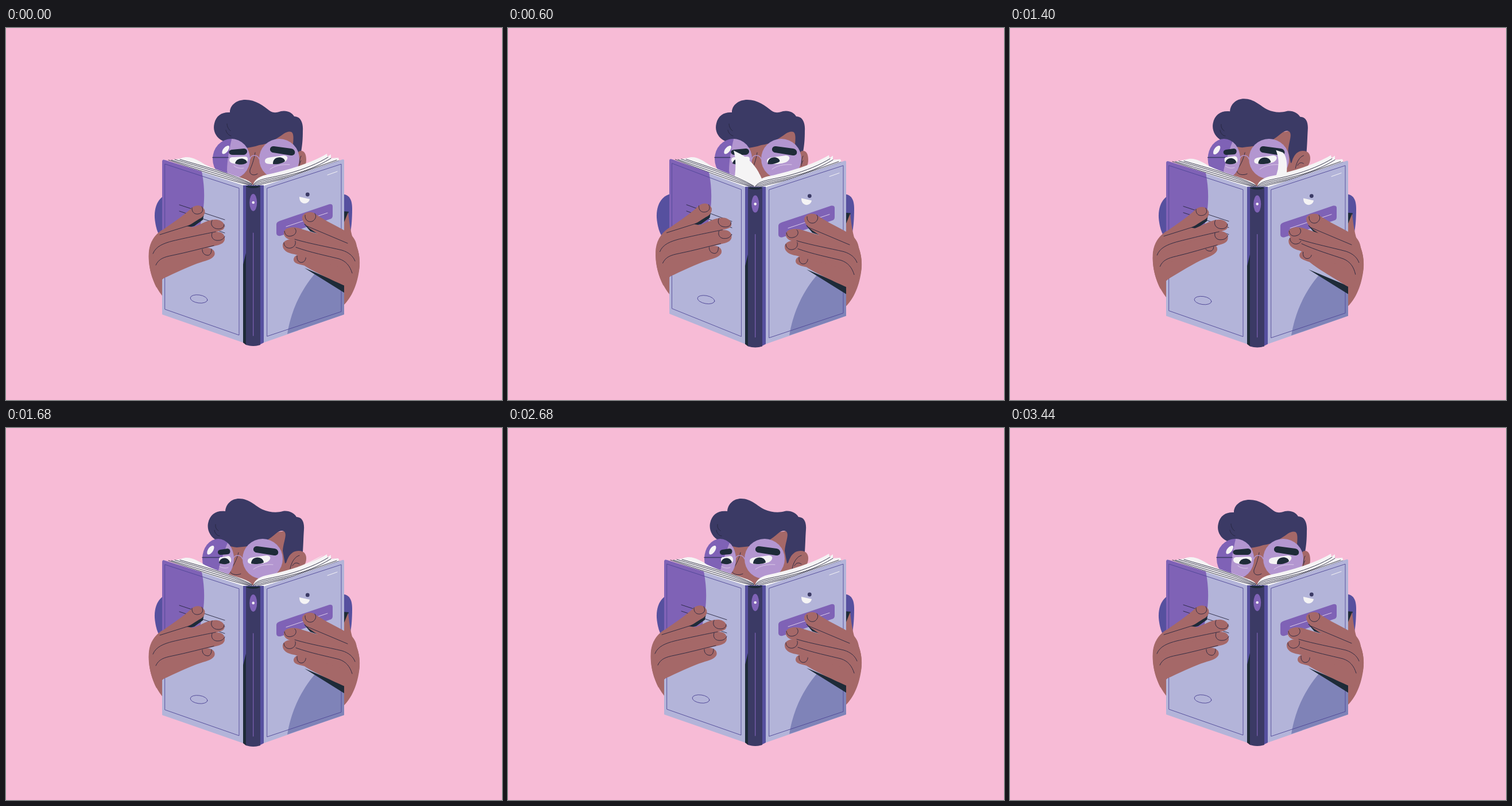
An HTML page for the animation above (3.48 s loop, 864x648 px).

```html
<!DOCTYPE html>
<html lang="en">
<head>
<meta charset="utf-8">
<title>Reader</title>
<style>
html, body { margin: 0; width: 100%; height: 100%; overflow: hidden; background: #f7bbd6; }
svg { display: block; width: 864px; height: 648px; }
.skin { fill: #a56868; }
.hair { fill: #3b3a65; }
.lilac { fill: #b396d0; }
.violet { fill: #7f62b6; }
.indigo { fill: #56509f; }
.cover { fill: #b3b4d9; }
.shade { fill: #7f83b8; }
.dark { fill: #1e2b38; }
.white { fill: #f5f4f5; }
.ink, .rim, .pale { fill: none; stroke-linecap: round; stroke-linejoin: round; }
.ink { stroke: #26263f; stroke-width: .9; }
.rim { stroke: #4f4796; stroke-width: .9; }
.pale { stroke: #dccbea; stroke-width: 1; }
</style>
</head>
<body>
<svg viewBox="0 0 864 648">
  <defs>
    <clipPath id="lensClip"><path
      d="M360,228 a32.5,35 0 1 1 65,0 a32.5,35 0 1 1 -65,0"
      data-b="M342,228 a27.5,35 0 1 1 55,0 a27.5,35 0 1 1 -55,0"/></clipPath>
    <clipPath id="lid"><rect id="lidRect" x="330" y="218" width="200" height="60"/></clipPath>
  </defs>

  <!-- shoulders -->
  <path class="indigo" d="M292,288 C268,288 258,308 259,330 C260,345 264,358 270,366 L292,366 Z"/>
  <path class="indigo" d="M580,289 C598,288 603,298 603,315 C603,330 602,345 600,355 L580,355 Z"/>

  <!-- head -->
  <g id="head">
    <path class="skin"
      d="M388,196 L505,178 L512,262 L430,285 L403,264 C392,255 385,240 388,220 Z"
      data-b="M372,196 L495,178 L505,262 L430,285 L380,260 C372,250 370,240 372,220 Z"/>
    <path class="hair"
      d="M378,197 C364,190 360,177 363,166 C366,152 377,146 390,147 C390,134 402,125 417,125 C435,125 449,136 459,144 C466,149 473,147 479,145 C489,143 498,147 502,154 C513,154 518,165 517,179 C517,194 516,204 514,216 L508,232 L499,215 C500,200 502,188 499,183 C497,179 490,180 484,184 C470,194 458,202 441,204 C432,207 425,208 419,209 C405,210 388,204 378,197 Z"
      data-b="M369,197 C355,190 350,177 352,166 C355,150 367,143 382,145 C383,132 393,123 406,123 C424,123 434,136 447,142 C458,147 472,148 482,145 C492,143 502,148 506,155 C516,155 520,164 519,177 C518,192 518,202 517,216 L486,236 L482,214 C483,200 489,188 486,182 C483,177 476,179 470,184 C460,193 448,201 431,204 C422,206 412,207 402,208 C392,207 380,203 369,197 Z"/>
    <path class="ink"
      d="M385,167 C385,172 388,177 391,179 M383,178 C384,183 388,187 392,188"
      data-b="M365,168 C364,173 367,177 370,179 M363,178 C364,184 368,188 372,188"/>
    <path class="skin"
      d="M505,250 C505,230 505,214 514,214 C521,214 523,222 523,230 C523,240 518,246 510,250 Z"
      data-b="M485,252 C487,230 494,214 510,214 C522,214 525,224 522,234 C519,242 512,250 500,254 Z"/>
    <path class="ink"
      d="M511,240 C511,232 512,226 514,223 M512,236 C512,234 513,232 514,231"
      data-b="M495,245 C497,234 503,224 511,222 M499,240 C502,234 507,234 511,237"/>
    <path class="ink"
      d="M434,217 C432,230 428,240 425,247 C423,256 432,258 438,254"
      data-b="M405,217 C402,230 396,240 391,247 C388,254 400,258 409,254"/>

    <g clip-path="url(#lensClip)">
      <path class="violet" d="M330,180 H440 V270 H330 Z"/>
      <path class="lilac"
        d="M394,190 C390,205 385,230 385,248 L388,270 L440,270 L440,190 Z"
        data-b="M390,190 C382,210 374,230 370,248 L372,270 L420,270 L420,190 Z"/>
    </g>
    <path class="lilac"
      d="M441,228 a35,35 0 1 1 70,0 a35,35 0 1 1 -70,0"
      data-b="M412,228 a35,35 0 1 1 70,0 a35,35 0 1 1 -70,0"/>
    <path class="pale" style="stroke:#b396d0;stroke-width:1.6"
      d="M425,228 C427,220 438,220 441,228" data-b="M396,228 C398,220 409,220 412,228"/>
    <path class="ink" style="stroke:#3b3a65;stroke-width:1.4"
      d="M360,225.5 L387,225.5" data-b="M342,225.5 L373,225.5"/>
    <path class="white"
      d="M377,219 C374,214 382,204 388,205 C392,208 383,222 377,219 Z"
      data-b="M351,220 C348,215 355,204 361,205 C366,208 357,223 351,220 Z"/>

    <g clip-path="url(#lid)">
      <path class="white"
        d="M389,230 C389,225 393,225 397,225 L416,224 C422,224 422,229 420,233 C417,238 408,238 401,237 C394,236 389,234 389,230 Z"
        data-b="M371,230 C371,225 373,225 376,225 L387,223 C391,223 393,228 392,232 C390,237 384,237 379,236 C374,236 371,234 371,230 Z"/>
      <path class="white"
        d="M451,232 C451,226 457,226 462,225 L484,222 C490,222 492,226 489,230 C485,236 472,237 463,237 C455,237 451,236 451,232 Z"
        data-b="M421,232 C421,226 427,226 432,225 L454,222 C460,222 462,226 459,230 C455,236 442,237 433,237 C425,237 421,236 421,232 Z"/>
      <path class="dark" id="pupilL"
        d="M399,236 C401,225 418,225 420,234 C417,238 406,239 399,236 Z"
        data-b="M371,235 C373,224 387,224 390,234 C387,238 376,238 371,235 Z"/>
      <path class="dark" id="pupilR"
        d="M465,237 C464,223 484,222 486,232 C482,236 472,238 465,237 Z"
        data-b="M427,236 C427,223 447,222 449,234 C445,237 434,238 427,236 Z"/>
    </g>
    <path class="dark"
      d="M393,212 L414,210 C422,210 422,220 414,221 L395,221 C387,221 386,213 393,212 Z"
      data-b="M373,212 L386,210 C392,210 392,220 386,220 L374,221 C368,221 367,213 373,212 Z"/>
    <path class="dark"
      d="M467,206 L497,210 C506,212 505,223 496,222 L465,217 C457,215 459,205 467,206 Z"
      data-b="M438,206 L468,210 C477,212 476,223 467,222 L436,217 C428,215 430,205 438,206 Z"/>
    <path class="pale"
      d="M397,240 C402,244 408,245 414,244 M460,246 C468,240 480,237 494,238"
      data-b="M372,241 C377,244 382,245 387,243 M431,246 C439,240 451,237 465,238"/>
  </g>

  <!-- book and hands -->
  <g id="book">
    <path class="white" id="page"/>
    <g class="left">
      <path class="white" d="M284,231 L294,229 L305,227 C320,221 334,230 347,238 C370,249 400,257 418,264 C426,268 430,271 430,276 L413,276 Z"/>
      <path class="ink" d="M283,230 C330,246 380,262 428,275 M288,230 C330,243 380,257 428,274 M294,229 C335,241 390,256 429,273 M303,229 C340,240 395,254 429,272"/>
    </g>
    <path class="white" d="M430,277 C430,266 440,259 452,256 C490,248 530,236 559,219 L560,224 L566,220 L566,227 L579,226 L581,232 L449,276 Z"/>
    <path class="ink" d="M431,273 C438,262 460,262 490,254 S545,235 561,225 M431,274 C440,265 462,264 495,256 S550,237 566,227 M432,275 C442,268 470,265 500,257 L576,230 M433,276 C448,270 475,266 505,257 L580,231"/>

    <g class="handL"><path class="skin" d="M290,484 C258,460 246,420 249,388 C251,370 262,357 275,350 L290,350 Z"/></g>
    <path class="dark" d="M585,319 L597,320 L588,352 Z"/>
    <path class="skin" d="M596,321 C598,340 600,352 604,366 C612,378 617,395 616,414 C614,440 605,466 589,482 L580,360 Z"/>

    <path class="cover left" d="M272,233 Q272,228 277,230 L413,274 V548 L272,499 Z"/>
    <g id="art">
      <path class="violet" d="M272,233 Q272,228 277,230 L341,250 C347,280 347,310 338,345 L272,362 Z"/>
      <ellipse class="rim" cx="336" cy="472" rx="15" ry="7" transform="rotate(8 336 472)"/>
      <path class="ink" d="M302,308 L381,334 M302,319 L381,345 M340,343 L381,357"/>
    </g>
    <path class="rim left" d="M277,237 L406,279 V535 L277,490 Z"/>

    <path class="cover" d="M449,275 L586,229 Q589,228 589,231 V499 L449,548 Z"/>
    <path class="shade" d="M490,533 C497,490 515,455 538,428 L589,450 V499 Z"/>
    <path class="rim" d="M455,279 L584,237 V494 L455,537 Z"/>
    <path class="pale" style="stroke:#f5f4f5" d="M560,256 L577,250"/>
    <circle class="hair" cx="525.3" cy="290" r="3.4"/>
    <path class="white" d="M511,294 L529,298 C528,304 522,307 517,305 C512,303 511,298 511,294 Z"/>
    <path class="violet" d="M477,336 L563,307 Q569,306 569,311 V327 Q569,332 564,333 L478,362 Q471,363 471,357 V342 Q471,338 477,336 Z"/>
    <path class="pale" d="M488,346 L560,322"/>

    <path class="indigo" d="M413,274 H449 V548 Q431,559 413,548 Z"/>
    <path class="dark" d="M413,412 L418,392 V552 L413,548 Z"/>
    <path class="hair" d="M418,275 H443 V552 Q431,556 418,552 Z"/>
    <path class="dark" d="M418,275 H443 Q441,279 431,279 Q420,279 418,275 Z"/>
    <ellipse class="violet" cx="430.7" cy="304" rx="6.5" ry="15"/>
    <circle class="white" cx="430.7" cy="304" r="2.3"/>
    <path class="pale" style="stroke:#7f62b6;stroke-width:1.2" d="M430.7,357 V536"/>

    <g class="handL">
      <path class="dark" d="M308,350 L346,317 L343,334 L328,345 Z"/>
      <path class="skin" d="M249,395 C249,378 258,362 272,352 L314,345 L326,347 L352,350 L356,366 L340,390 L320,400 L272,438 L262,452 C254,436 248,415 249,395 Z"/>
      <g id="l4">
        <path class="skin" d="M252,405 L345,383 C358,381 366,388 363,396 C360,402 350,405 340,408 C320,414 295,427 272,437 L258,440 Z"/>
        <path class="ink" d="M342,384 C341,392 346,396 352,396 C357,395 358,390 358,385"/>
      </g>
      <g id="l3">
        <path class="skin" d="M256,397 L350,358 C365,353 380,354 381,365 C382,374 375,377 366,379 C350,383 330,388 300,395 L262,416 Z"/>
        <path class="ink" d="M261,413 C266,402 275,399 290,396 C315,391 340,384 362,379 M359,357 C356,365 362,371 370,370 C376,370 380,366 381,363"/>
      </g>
      <g id="l2">
        <path class="skin" d="M262,374 L340,341 C350,336 360,333 368,334 C380,336 384,346 378,351 C372,355 362,355 350,358 L260,392 Z"/>
        <path class="ink" d="M256,393 C261,380 275,375 290,371 C320,364 350,358 365,355 M359,335 C355,342 360,350 370,350 C376,350 380,347 380,342"/>
      </g>
      <g id="l1">
        <path class="skin" d="M258,366 C270,350 300,336 324,313 C331,307 342,308 346,317 C348,324 343,330 336,333 C325,340 318,345 310,347 L266,376 Z"/>
        <path class="ink" d="M268,360 L322,343 M324,313 C323,326 336,326 341,321 C344,317 342,313 341,311"/>
      </g>
    </g>

    <g>
      <path class="dark" d="M520,418 L589,447 V461 Z"/>
      <path class="dark" d="M519,341 L530,344 L548,360 L530,354 Z"/>
      <path class="skin" d="M590,353 C608,364 617,390 616,412 C615,432 607,448 596,452 L585,446 L545,420 L515,398 L500,374 L507,362 L560,362 Z"/>
      <g id="r4">
        <path class="skin" d="M501,403 C502,395 512,393 523,395 L605,415 L600,452 L590,449 C570,440 535,424 520,414 C508,411 501,410 501,403 Z"/>
        <path class="ink" d="M507,397 C506,405 511,410 517,408 C522,406 523,400 522,396"/>
      </g>
      <g id="r3">
        <path class="skin" d="M482,377 C484,369 495,366 507,370 L600,393 L605,425 L560,410 C540,404 515,398 502,394 C490,392 481,387 482,377 Z"/>
        <path class="ink" d="M505,382 C530,391 560,397 580,402 C592,406 599,414 603,427 M484,374 C484,381 491,385 497,383 C504,381 506,374 503,369"/>
      </g>
      <g id="r2">
        <path class="skin" d="M484,356 C485,348 497,346 508,348 L560,364 L606,400 L560,388 C540,382 515,372 500,370 C489,368 483,363 484,356 Z"/>
        <path class="ink" d="M503,368 C530,376 560,381 585,387 C598,391 605,398 608,406 M485,354 C486,362 492,364 498,362 C506,360 507,352 503,349"/>
      </g>
      <g id="r1">
        <path class="skin" d="M516,330 C517,322 528,319 536,322 C555,336 580,346 598,358 C606,364 610,372 611,380 L570,378 L533,352 C524,346 516,338 516,330 Z"/>
        <path class="ink" d="M524,345 L595,375 M521,326 C520,335 528,340 535,336 C540,332 541,327 538,323"/>
      </g>
    </g>
  </g>
</svg>
<script>
const LOOP = 3480;
const $ = id => document.getElementById(id);
const mix = (a, b, k) => a + (b - a) * k;

// cubic ease in and out between two times
function ease(t, from, to) {
  const k = Math.min(1, Math.max(0, (t - from) / (to - from)));
  return k < .5 ? 4 * k ** 3 : 1 - (2 - 2 * k) ** 3 / 2;
}
const pulse = (t, a, b, c, d) => ease(t, a, b) - ease(t, c, d);

// blend two paths of the same structure; arc flags must stay bare integers
function blend(a, b, k) {
  const to = b.match(/-?[\d.]+/g);
  let i = 0;
  return a.replace(/-?[\d.]+/g, n => +mix(+n, +to[i++], k).toFixed(2));
}

const morphs = [...document.querySelectorAll('[data-b]')].map(el =>
  ({ el, a: el.getAttribute('d'), b: el.dataset.b }));

const sheet = [
  [200, 'M306,228 Q345,239 380,256 L430,274 L418,266 Q370,250 322,228 Z'],
  [600, 'M393,211 Q399,232 394,262 L430,274 L442,260 Q430,231 405,217 Z'],
  [1080, 'M433,206 Q438,236 431,270 L431,274 L461,252 Q460,219 447,210 Z'],
  [1400, 'M463,210 Q472,233 463,256 L431,274 L482,250 Q484,222 475,214 Z'],
  [1700, 'M555,223 Q520,240 480,253 L431,274 L480,252 Q530,238 558,221 Z']
];

function sheetAt(t) {
  const i = sheet.findIndex(s => t < s[0]);
  if (i < 1) return sheet[i ? sheet.length - 1 : 0][1];
  const [t0, a] = sheet[i - 1], [t1, b] = sheet[i];
  return blend(a, b, (t - t0) / (t1 - t0));
}

const move = (el, x, y) => el.setAttribute('transform', `translate(${x} ${y})`);
const turn = (id, deg, x, y) => $(id).setAttribute('transform', `rotate(${deg} ${x} ${y})`);
const leftParts = document.querySelectorAll('.left');
const leftHand = document.querySelectorAll('.handL');

function draw(t) {
  const look = pulse(t, 1160, 1520, 2860, 3260);
  for (const m of morphs) m.el.setAttribute('d', blend(m.a, m.b, look));

  const gaze = pulse(t, 250, 550, 700, 1000);
  move($('pupilL'), -8 * gaze, 0);
  move($('pupilR'), -12.5 * gaze, 0);
  $('lidRect').setAttribute('y', mix(219, 239, pulse(t, 1980, 2100, 2140, 2260)));

  move($('book'), 0, t < 2000 ? 4 * Math.sin(Math.PI * t / 2000) ** 2 : 0);
  $('page').setAttribute('d', sheetAt(t));

  // left cover swings inwards around the spine, its print slides along
  const swing = pulse(t, 180, 560, 640, 1000);
  const sx = 1 - .065 * swing, ky = .028 * swing, skew = .04 * swing;
  for (const el of leftParts)
    el.setAttribute('transform', `matrix(${sx} ${ky} 0 1 ${413 * (1 - sx)} ${-413 * ky})`);
  $('art').setAttribute('transform', `matrix(1 ${skew} 0 1 ${9 * swing} ${-4 * swing - 272 * skew})`);
  for (const el of leftHand) move(el, 8.5 * swing, -6 * swing);

  const curl = pulse(t, 1180, 1370, 1440, 1680);
  const tap = pulse(t, 1840, 2010, 2070, 2240);
  turn('l1', -5 * tap, 262, 365);
  turn('l2', -1.5 * curl - 2 * tap, 258, 385);
  turn('l3', -2 * curl, 258, 405);
  turn('l4', -6 * curl, 255, 412);
  turn('r1', 5 * tap, 605, 372);
  turn('r2', 1.5 * curl + 2 * tap, 608, 400);
  turn('r3', 5 * curl, 608, 412);
  turn('r4', 6 * curl, 606, 428);
}

function tick() {
  draw(performance.now() % LOOP);
  requestAnimationFrame(tick);
}
tick();
</script>
</body>
</html>
```
